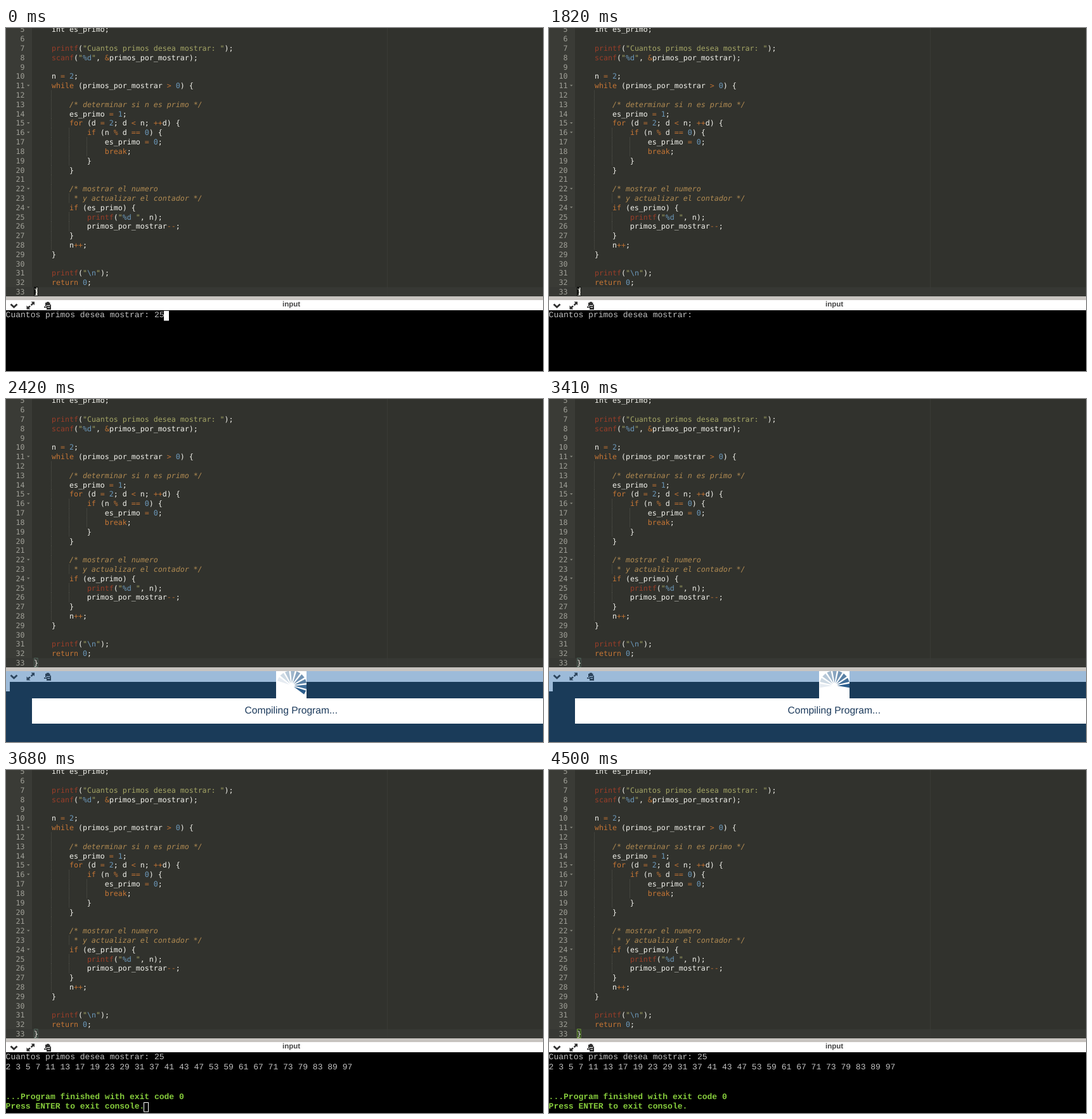
Animation, 847 px wide and 542 px high, one loop 4900 ms. Source, as an HTML page:

```html
<!DOCTYPE html>
<html lang="es">
<head>
<meta charset="utf-8">
<title>Primos</title>
<style>
html, body { margin: 0; width: 100%; height: 100%; overflow: hidden; background: #000; }
svg { display: block; width: 847px; height: 542px; }
text { white-space: pre; text-rendering: geometricPrecision; }
#code text { font: 11.61px "DejaVu Sans Mono", monospace; fill: #f2f2ec; }
#code .num { fill: #a0a098; text-anchor: end; }
.comment { fill: #b18b52; font-style: italic; }
.string { fill: #a5a666; }
.func { fill: #9a3e29; }
.word { fill: #c67635; }
.const { fill: #6c99bb; }
.op { fill: #bd7133; }
.term { font: 13.02px "Liberation Mono", monospace; fill: #c2c2c2; }
.done { font-weight: bold; fill: #86cc3c; }
</style>
</head>
<body>
<svg viewBox="0 0 847 542">
  <defs>
    <clipPath id="editorClip"><rect width="847" height="424"/></clipPath>
    <clipPath id="consoleClip"><rect y="446" width="847" height="96"/></clipPath>
    <clipPath id="spinClip"><rect x="426" y="430" width="48" height="43"/></clipPath>
  </defs>

  <g clip-path="url(#editorClip)">
    <rect width="847" height="424" fill="#31322d"/>
    <rect width="41" height="424" fill="#3a3b36"/>
    <rect y="409.5" width="847" height="15" fill="#373834"/>
    <path d="M601.5 0V424" stroke="#393a36"/>
    <rect id="brace" x="44.5" y="409.5" width="5.5" height="14"/>
    <g id="code"></g>
    <rect id="caret" x="48" y="410" width="1.5" height="13" fill="#e8e8e0"/>
  </g>

  <rect y="424" width="847" height="6" fill="#c8c4c0"/>
  <rect id="bar" y="430" width="847" height="17"/>
  <g id="icons">
    <path d="M7.5 436.5L12.5 441L17.5 436.5" fill="none" stroke="currentColor" stroke-width="2.8"/>
    <path d="M39.5 432.5H45V438L43.2 436.2L40.5 439L38.7 437.2L41.4 434.4ZM32.5 438.5V444.5H38.5L36.4 442.6L39 440L37 438.4L34.5 440.5Z" fill="currentColor"/>
    <path d="M62 434H69.5V437H71V445H64V442H60V440H62ZM64 432.8H68V435H64Z" fill="currentColor"/>
    <path id="iconGap" d="M65 438.5H69.5M65.5 441.5H69M62 441L65 438" fill="none"/>
  </g>

  <g id="console">
    <text x="436" y="440" font-family="Liberation Sans, Arial, sans-serif" font-size="11.5" font-weight="bold" fill="#454545">input</text>
    <rect y="446" width="847" height="96" fill="#000"/>
    <g clip-path="url(#consoleClip)">
      <text id="prompt" class="term" x="-0.4" y="457"></text>
      <g id="output">
        <text id="primes" class="term" x="-0.4" y="472.6"></text>
        <text class="term done" x="-0.4" y="520">...Program finished with exit code 0</text>
        <text class="term done" x="-0.4" y="535.4">Press ENTER to exit console.</text>
      </g>
      <rect id="cursor" stroke="#fff"/>
    </g>
  </g>

  <g id="overlay">
    <rect y="447" width="847" height="95" fill="#1a3b59"/>
    <rect y="447" width="6" height="15" fill="#9dbbd9"/>
    <rect x="426" y="430" width="48" height="44" fill="#fff"/>
    <g clip-path="url(#spinClip)"><g id="spinner" fill="#2b5d8c"></g></g>
    <rect x="41" y="473" width="806" height="40" fill="#fff"/>
    <text x="376.5" y="497" font-family="Liberation Sans, Arial, sans-serif" font-size="15.6" fill="#1d3b5c">Compiling Program...</text>
  </g>
</svg>

<script>
const LOOP = 4900, FIRST = 5, ROW = 14.81, CELL = 7.8;
const $ = id => document.getElementById(id);

const source = String.raw`    int es_primo;

    printf("Cuantos primos desea mostrar: ");
    scanf("%d", &primos_por_mostrar);

    n = 2;
    while (primos_por_mostrar > 0) {

        /* determinar si n es primo */
        es_primo = 1;
        for (d = 2; d < n; ++d) {
            if (n % d == 0) {
                es_primo = 0;
                break;
            }
        }

        /* mostrar el numero
         * y actualizar el contador */
        if (es_primo) {
            printf("%d ", n);
            primos_por_mostrar--;
        }
        n++;
    }

    printf("\n");
    return 0;
}`.split("\n");

const kinds = ["comment", "string", "func", "word", "const", "op"];
const token = /(\/\*.*|\* y.*)|("[^"]*")|(printf|scanf)|\b(while|for|if|break|return)\b|(\d+)|([=<>%&+-]+)|[\w]+|./g;
const escape = s => s.replace(/&/g, "&amp;").replace(/</g, "&lt;");
const span = (kind, s) => `<tspan class="${kind}">${s}</tspan>`;

function highlight(line) {
  return line.replace(token, (s, ...groups) => {
    const kind = kinds.find((_, i) => groups[i] !== undefined);
    const safe = escape(s);
    if (!kind) return safe;
    return span(kind, kind === "string" ? safe.replace(/%d|\\n/g, m => span("const", m)) : safe);
  });
}

function buildCode() {
  let html = "";
  source.forEach((line, i) => {
    const n = FIRST + i, y = 32 + (n - 7) * ROW;
    // blank lines inside the loop keep one guide
    const indent = line.trim() ? line.search(/\S/) : n > 11 && n < 29 ? 8 : 0;
    for (let col = 4; col < indent; col += 4) {
      const x = Math.round(44 + col * 6.99) - 0.5;
      html += `<path d="M${x} ${y - 7.4}v${ROW}" stroke="#54554e" stroke-dasharray="1 1"/>`;
    }
    html += `<text class="num" x="29.5" y="${y + 4}">${n}</text>`;
    html += `<text x="44" y="${y + 4}">${highlight(line)}</text>`;
    if ([11, 15, 16, 22, 24].includes(n)) {
      html += `<path d="M33 ${y - 1.5}h4.5l-2.25 2.5z" fill="#85867d"/>`;
    }
  });
  $("code").innerHTML = html;
}

function firstPrimes(count) {
  const found = [];
  for (let n = 2; found.length < count; n++) {
    if (found.every(p => n % p)) found.push(n);
  }
  return found.join(" ");
}

function buildSpinner() {
  const at = (r, deg) => {
    const a = deg * Math.PI / 180;
    return `${(r * Math.sin(a)).toFixed(2)} ${(-r * Math.cos(a)).toFixed(2)}`;
  };
  let html = "";
  for (let k = 0; k < 9; k++) {
    const a = -k * 22.5;
    html += `<path d="M${at(4, a)}L${at(24, a - 8)}L${at(24, a + 8)}Z" opacity="${1 - k * 0.11}"/>`;
  }
  $("spinner").innerHTML = html;
}

// value of the last [start, value] pair already reached
const pick = (t, steps) => steps.reduce((v, [start, next]) => t >= start ? next : v, steps[0][1]);
const show = (id, on) => $(id).setAttribute("display", on ? "inline" : "none");
function set(id, attrs) {
  for (const name in attrs) $(id).setAttribute(name, attrs[name]);
}

function draw(t) {
  const busy = t >= 2020 && t < 3680, finished = t >= 3680;
  show("console", !busy);
  show("overlay", busy);
  show("output", finished);
  set("bar", { fill: busy ? "#9dbbd9" : "#fff" });
  set("icons", { color: busy ? "#2d455d" : "#303030" });
  set("iconGap", { stroke: busy ? "#9dbbd9" : "#fff" });
  set("brace", {
    stroke: pick(t, [[0, "#0c0d0a"], [2020, "#50645a"], [4500, "#6f9c3a"]]),
    fill: pick(t, [[0, "#1a1b18"], [2020, "#373834"], [4500, "#2c3a20"]])
  });
  show("caret", t < 2020);

  const typed = finished ? "25" : pick(t, [[0, "25"], [740, "2"], [950, ""]]);
  const prompt = "Cuantos primos desea mostrar: " + typed;
  $("prompt").textContent = prompt;

  const look = pick(t, [[0, "full"], [400, "off"], [1020, "full"], [1620, "off"],
                        [3680, "hollow"], [4170, "full"], [4500, "off"]]);
  show("cursor", look !== "off");
  set("cursor", {
    x: Math.round((finished ? 28 : prompt.length) * CELL - 1) + 0.5,
    y: finished ? 525.5 : 447.5,
    width: 7, height: 14.5,
    fill: look === "full" ? "#fff" : "none"
  });

  const angle = pick(t, [[0, 210], [2420, 117], [3410, 90], [3480, 60], [3550, 32]]);
  set("spinner", { transform: `translate(450.5 453) rotate(${angle})` });
}

buildCode();
buildSpinner();
$("primes").textContent = firstPrimes(25);

const began = performance.now();
function tick() {
  draw((performance.now() - began) % LOOP);
  requestAnimationFrame(tick);
}
tick();
</script>
</body>
</html>
```
